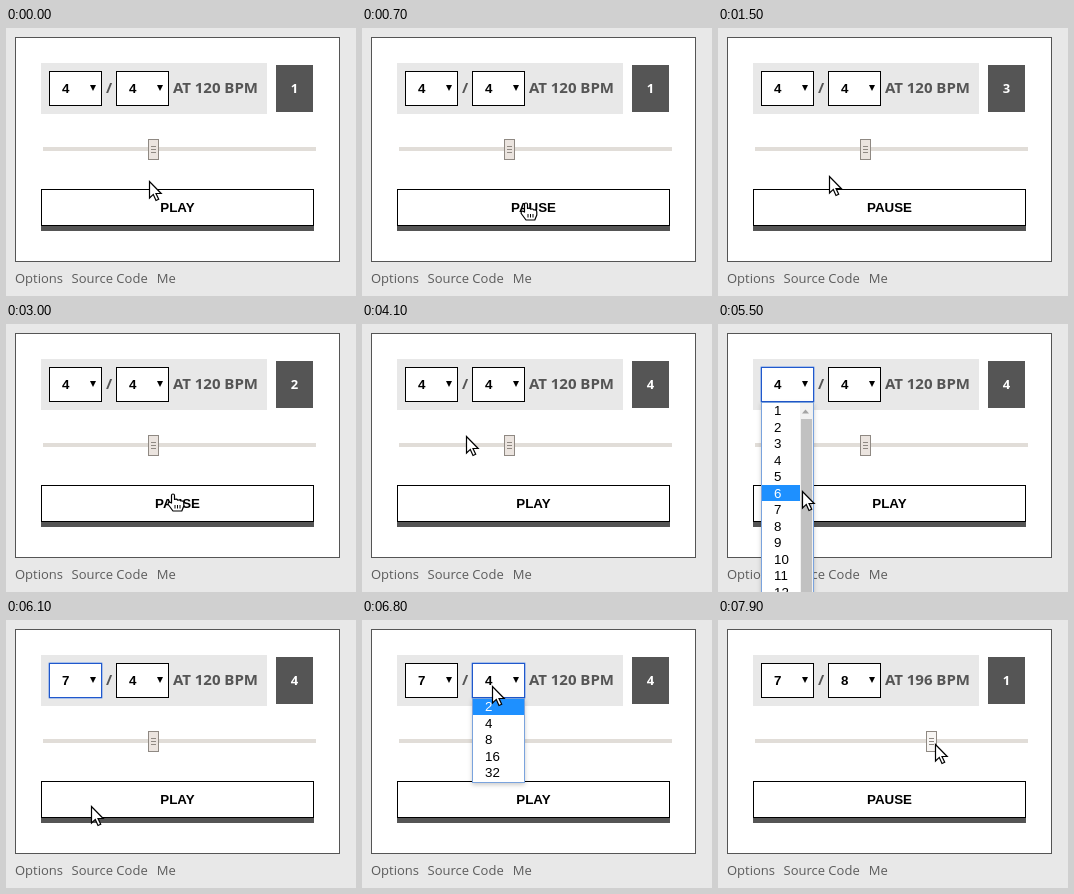
An HTML page that plays this animation: 350 px wide and 268 px high, repeating every 8000 ms.

```html
<!DOCTYPE html>
<html lang="en">
<head>
<meta charset="utf-8">
<title>Metronome</title>
<style>
html, body { margin: 0; width: 100%; height: 100%; overflow: hidden; background: #e8e8e8; }
svg { display: block; width: 350px; height: 268px; }
.ui { font: bold 13.33px "Liberation Sans", Arial, sans-serif; }
.item { font: 13.33px "Liberation Sans", Arial, sans-serif; }
.head { font: bold 15px "Open Sans", sans-serif; fill: #555; }
.count { font: bold 13px "Open Sans", sans-serif; fill: #fff; }
.foot { font: 13px "Open Sans", sans-serif; fill: #5c5c5c; }
.mid { text-anchor: middle; }
.box { fill: #fff; stroke: #000; }
.focus .box { stroke: #2058cc; }
.glow { fill: none; stroke: #5b8fe8; stroke-opacity: 0; }
.focus .glow { stroke-opacity: .45; }
.list { filter: drop-shadow(0 2px 2px rgba(0, 0, 0, .2)); }
.off { display: none; }
</style>
</head>
<body>
<svg viewBox="0 0 350 268">
  <rect width="350" height="268" fill="#e8e8e8"/>
  <rect x="9.5" y="9.5" width="324" height="224" fill="#fff" stroke="#555"/>
  <rect x="35" y="35" width="226" height="51" fill="#e8e8e8"/>
  <g id="beats" transform="translate(43 43)"></g>
  <text class="head" x="100" y="65">/</text>
  <g id="unit" transform="translate(110 43)"></g>
  <text class="head" id="tempo" x="166.9" y="65">AT 120 BPM</text>
  <rect x="270" y="37" width="37" height="47" fill="#555"/>
  <text class="count mid" id="count" x="288.5" y="65">1</text>

  <rect x="37" y="119" width="273" height="4" fill="#e1ddd8"/>
  <g id="thumb">
    <rect x="142.5" y="111.5" width="10" height="20" fill="#ebe4df" stroke="#8f8983"/>
    <path d="M145 118.5h5m-5 3h5m-5 3h5" stroke="#8f8983"/>
  </g>

  <rect x="35" y="198" width="273" height="5" fill="#555"/>
  <rect class="box" x="35.5" y="161.5" width="272" height="36"/>
  <text class="ui mid" id="play" x="171.5" y="184">PLAY</text>

  <text class="foot" x="9" y="255">Options</text>
  <text class="foot" x="65.5" y="255">Source Code</text>
  <text class="foot" x="150.8" y="255">Me</text>

  <g class="list" id="beatList" transform="translate(43 78)"></g>
  <g class="list" id="unitList" transform="translate(110 78)"></g>

  <path id="arrow" fill="#fff" stroke="#000" stroke-width="1.2"
    d="M.5 .5v16.5l3.8-3.6 2.7 6.1 2.7-1.2-2.7-5.8h5.2z"/>
  <g id="hand" stroke="#000" stroke-linejoin="round">
    <path fill="#fff" stroke-width="1.2"
      d="M-1.5 9V1.5Q-1.5 0 0 0T1.5 1.5V5.5Q4 4.5 4.7 6.2Q7 5.2 7.8 7Q10.8 6.3 10.8 9V12L8.8 17H0L-4.8 10.5Q-5.2 8 -3 8.2Z"/>
    <path d="M2 11v3.500m2.500-3.500v3.500m2.500-3.500v3.500"/>
  </g>
</svg>
<script>
const LOOP = 8000, TICK = 100, ROW = 16.5;
const $ = id => document.getElementById(id);

// Pointer stops: time, x, y
const stops = [
  [0, 143, 153], [700, 164, 175], [1500, 111, 148], [2600, 117, 156],
  [3000, 167, 170], [3600, 166, 181], [4400, 76, 80], [5000, 76, 80],
  [5400, 84, 165], [5900, 85, 186], [6100, 85, 186], [6800, 130, 66],
  [6900, 132, 93], [7100, 136, 133], [7200, 136, 124], [7300, 136, 124],
  [7600, 159, 147], [7800, 163, 165], [7900, 217, 124], [LOOP, 217, 124]
];

const ease = k => k * k * (3 - 2 * k);

function pointer(t) {
  const i = stops.findIndex(s => s[0] > t);
  const [t0, x0, y0] = stops[i - 1], [t1, x1, y1] = stops[i];
  const k = ease((t - t0) / (t1 - t0));
  return [Math.round(x0 + (x1 - x0) * k), Math.round(y0 + (y1 - y0) * k)];
}

function makeSelect(id) {
  $(id).innerHTML = `<rect class="glow" x="-.5" y="-.5" width="54" height="36" rx="1"/>
    <rect class="box" x=".5" y=".5" width="52" height="34"/>
    <text class="ui" x="13" y="22">4</text>
    <path d="M41 14h6l-3 6z"/>`;
}

function makeList(id, items, height, scrolls) {
  const texts = items.map((n, i) =>
    `<text class="item" x="13" y="${Math.floor(13.5 + ROW * i)}">${n}</text>`);
  const bar = `<rect x="39" y="1" width="13" height="190" fill="#f1f1f1"/>
    <rect x="40" y="17" width="11" height="174" fill="#c1c1c1"/>
    <path d="M41 11.5h7l-3.5-4z" fill="#a3a3a3"/>`;
  $(id).innerHTML = `<rect x=".5" y=".5" width="52" height="${height}" fill="#fff" stroke="#7aa3dd"/>
    <rect class="mark" x="1" width="${scrolls ? 38 : 51}" height="16" fill="#1e90ff"/>
    ${texts.join("")}${scrolls ? bar : ""}`;
}

function drawList(id, open, y) {
  const list = $(id), texts = list.querySelectorAll("text");
  const row = Math.max(0, Math.min(texts.length - 1, Math.floor((y - 79) / ROW)));
  list.classList.toggle("off", !open);
  list.querySelector(".mark").setAttribute("y", 1 + Math.floor(row * ROW));
  texts.forEach((el, i) => el.setAttribute("fill", i === row ? "#fff" : "#000"));
}

function drawSelect(id, value, focus) {
  $(id).querySelector("text").textContent = value;
  $(id).classList.toggle("focus", focus);
}

function beat(t) {
  if (t < 900 || t >= 7800) return 1;
  return (1 + Math.floor((Math.min(t, 3500) - 900) / 433)) % 4 + 1;
}

function draw(t) {
  const within = (a, b) => t >= a && t < b;
  const [x, y] = pointer(t);
  const beatsOpen = within(4600, 6100), unitOpen = within(6700, 7400);
  const fast = t >= 7900;

  drawSelect("beats", t < 6100 ? 4 : 7, within(4600, 6700));
  drawSelect("unit", t < 7400 ? 4 : 8, within(6700, 7800));
  drawList("beatList", beatsOpen, y);
  drawList("unitList", unitOpen, y);
  $("tempo").textContent = `AT ${fast ? 196 : 120} BPM`;
  $("thumb").setAttribute("transform", `translate(${fast ? 66 : 0} 0)`);
  $("thumb").firstElementChild.setAttribute("fill", fast ? "#f8f6f4" : "#ebe4df");
  $("count").textContent = beat(t);
  $("play").textContent = within(600, 3700) || t >= 7800 ? "PAUSE" : "PLAY";

  const hand = y > 161 && y < 203 && !within(4600, 6200);
  $("hand").classList.toggle("off", !hand);
  $("arrow").classList.toggle("off", hand);
  $(hand ? "hand" : "arrow").setAttribute("transform", `translate(${x} ${y})`);
}

["beats", "unit"].forEach(makeSelect);
makeList("beatList", Array.from({ length: 12 }, (_, i) => i + 1), 200, true);
makeList("unitList", Array.from({ length: 5 }, (_, i) => 2 ** (i + 1)), 84, false);

function loop() {
  draw(Math.floor(performance.now() % LOOP / TICK) * TICK);
  requestAnimationFrame(loop);
}
loop();
</script>
</body>
</html>
```
